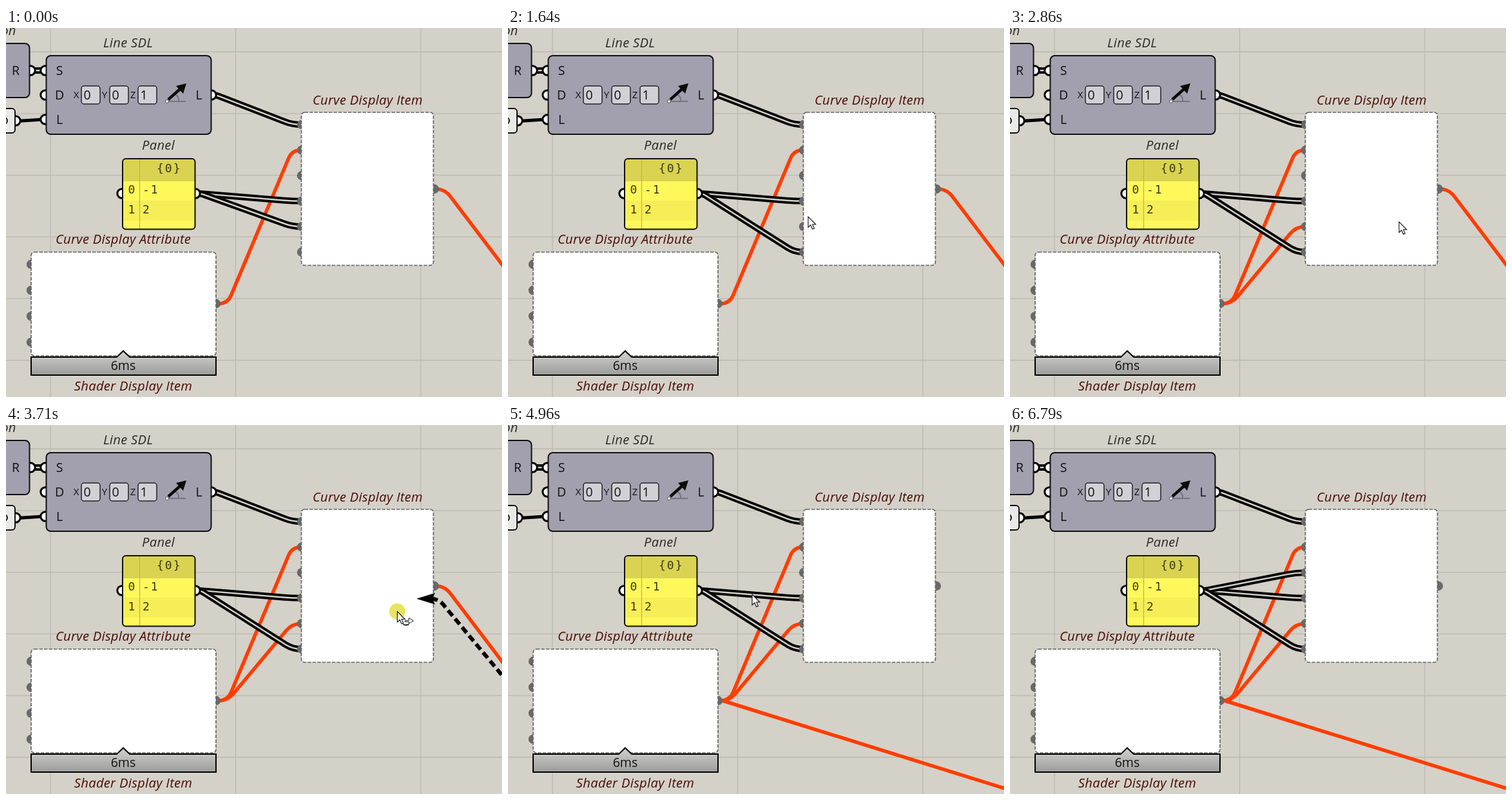
An HTML page that plays this animation: 770x573 px, repeating every 7910 ms.

```html
<!DOCTYPE html>
<html lang="en">
<head>
<meta charset="utf-8">
<title>Rewiring nodes</title>
<style>
html, body { margin: 0; width: 100%; height: 100%; overflow: hidden; background: #d4d1c8; }
svg { display: block; width: 770px; height: 573px; }
text { font: 19.5px "Open Sans", "Noto Sans", sans-serif; fill: #111; }
.title { font-size: 20.2px; font-style: italic; letter-spacing: .3px; text-anchor: middle; fill: #4a0c06; }
.dark { fill: #2b2925; }
.mid { text-anchor: middle; }
.axis { font-size: 15px; text-anchor: middle; }
.mono { font: 18px "DejaVu Sans Mono", "Noto Sans Mono", monospace; letter-spacing: 2px; fill: #3c3912; }
.node { fill: #a2a0ae; stroke: #111; stroke-width: 2; }
.blank { fill: #fff; stroke: #666; stroke-width: 1.7; stroke-dasharray: 5.5 2; }
.field { fill: #d1d0d6; stroke: #222; stroke-width: 1.5; }
.port { fill: #fff; stroke: #000; stroke-width: 3; }
.grip { fill: #696969; }
path { fill: none; }
.red { stroke: #ff3d00; stroke-width: 5.5; }
.outer { stroke: #000; stroke-width: 10; }
.inner { stroke: #d4d1c8; stroke-width: 2.4; }
.single { stroke: #000; stroke-width: 5; }
</style>
</head>
<body>
<svg viewBox="0 0 770 573">
  <defs>
    <linearGradient id="steel" x1="0" y1="0" x2="0" y2="1">
      <stop offset="0" stop-color="#d2d2d0"/><stop offset="1" stop-color="#9c9c9a"/>
    </linearGradient>
  </defs>
  <g id="grid" stroke="#bbb8af" stroke-width="1.3"></g>
  <g id="wires"></g>
  <g id="ports"></g>

  <rect class="node" x="-20" y="24" width="56.5" height="84" rx="7"/>
  <text class="mid" x="15" y="73">R</text>
  <rect class="node" x="-20" y="125" width="34" height="38" rx="5" style="fill:#e9e9e7"/>
  <circle cx="-3" cy="144" r="5" fill="none" stroke="#111" stroke-width="2"/>

  <rect class="node" x="62.5" y="43" width="256" height="122" rx="7"/>
  <g id="fields"></g>
  <path d="M250 114H279M250 114L262 103Q269 106 268 114" stroke="#777580" stroke-width="2"/>
  <path d="M252 111L271 94" stroke="#0b0b0b" stroke-width="4.5"/>
  <path d="M280 86L275 102L264 90Z" style="fill:#0b0b0b"/>
  <circle cx="250" cy="114" r="2.5" fill="#eee" stroke="#555"/>

  <rect x="181" y="203" width="112.5" height="109.5" rx="5" fill="#fff85b"/>
  <path d="M181 238V208Q181 203 186 203H288Q293.5 203 293.5 208V238Z" style="fill:#d9d351"/>
  <rect x="182" y="268" width="111" height="31" fill="#f5ee57"/>
  <path d="M207.5 204V312" stroke="#bdb54a" stroke-width="1.2"/>
  <rect x="181" y="203" width="112.5" height="109.5" rx="5" fill="none" stroke="#111" stroke-width="2"/>
  <text class="mono" x="234" y="224">{0}</text>
  <text class="mono" x="189.5" y="257">0</text>
  <text class="mono" x="189.5" y="288">1</text>
  <text class="mono" x="212" y="257">-1</text>
  <text class="mono" x="212" y="288">2</text>

  <rect class="blank" x="458.5" y="131" width="205" height="237.5" rx="5"/>
  <rect class="blank" x="39" y="348" width="287" height="161" rx="5"/>
  <path d="M39 511H172L182 501.5L192 511H326V539H39Z" style="fill:url(#steel)" stroke="#000" stroke-width="2"/>
  <text class="mid" x="182" y="531">6ms</text>

  <g id="titles"></g>

  <path id="lead" stroke="#000" stroke-width="6" stroke-dasharray="11 6"/>
  <path id="head" d="M0 0L-29 -9L-24 0L-29 9Z" style="fill:#000"/>
  <g id="cursor">
    <g id="press">
      <circle r="12.5" fill="#e6df4c" opacity=".88"/>
      <path d="M9 20Q13 22 18 20" stroke="#444" stroke-width="2.5"/>
      <path d="M12 14H18V10L25 14.5L18 19V16H12Z" style="fill:#fff" stroke="#222"/>
    </g>
    <path d="M0 0V16.5L3.9 13L6.6 19.3L9.4 18.1L6.7 12H11.8Z" style="fill:#fff" stroke="#111" stroke-width="1.1"/>
  </g>
</svg>
<script>
const LOOP = 7910, STEP = 70;
const $ = id => document.getElementById(id);

function add(parent, tag, attrs, text) {
  const el = document.createElementNS("http://www.w3.org/2000/svg", tag);
  for (const k in attrs) el.setAttribute(k, attrs[k]);
  if (text) el.textContent = text;
  return $(parent).appendChild(el);
}
const show = (el, on) => el.setAttribute("visibility", on ? "visible" : "hidden");

// Wire with a horizontal stub at both ends and rounded corners
function route([x1, y1], [x2, y2], d1 = 14, d2 = 14) {
  const ax = x1 + d1, bx = x2 - d2, dx = bx - ax, dy = y2 - y1;
  const len = Math.hypot(dx, dy) || 1;
  const bend = d => Math.min(d, len / 2) / len;
  const r1 = bend(d1), r2 = bend(d2);
  return `M${x1} ${y1}Q${ax} ${y1} ${ax + dx * r1} ${y1 + dy * r1}` +
         `L${bx - dx * r2} ${y2 - dy * r2}Q${bx} ${y2} ${x2} ${y2}`;
}

const wire = (d, ...layers) => layers.map(c => add("wires", "path", { class: c, d }));
const redWire = d => wire(d, "red");
const doubleWire = (a, b) => wire(route(a, b, 5, 13), "outer", "inner");

const input = i => [458, 150 + 39.6 * i];
const PANEL = [297, 257], ATTR = [330, 428], OUT = [667, 250], FAR = [973, 616];

for (let i = 0; i < 3; i++) add("grid", "path", { d: `M${69 + i * 287.5} 0V573` });
for (let i = 0; i < 6; i++) add("grid", "path", { d: `M0 ${37 + i * 95.8}H770` });

// Fixed wires, and the ones each drag swaps on release; red lies below black
redWire(route(ATTR, input(1)));
const attrIn = redWire(route(ATTR, input(4)));
const outFar = redWire(route(OUT, FAR));
const attrFar = redWire("M333 428L770 564");
doubleWire([321, 104], input(0));
doubleWire(PANEL, input(3));
const [panel2, panel4, panel5] = [2, 4, 5].map(i => doubleWire(PANEL, input(i)));
wire("M37 66H61", "outer", "inner");
wire("M18 144.5L58 142", "single");

const port = (cx, cy, cls = "port") => add("ports", "circle", { class: cls, cx, cy, r: 7.2 });
port(38, 66);
port(15, 144);
port(319, 104);
port(180, 257);
port(294, 257);
for (let i = 0; i < 3; i++) port(61, 66 + i * 38);
for (let i = 0; i < 6; i++) port(459, input(i)[1], "grip");
for (let i = 0; i < 4; i++) port(39, 367 + i * 40.3, "grip");
port(665, 250, "grip");
port(326, 428, "grip");

[..."SDL"].forEach((s, i) => add("fields", "text", { class: "mid", x: 83, y: 73 + i * 38 }, s));
[..."XYZ"].forEach((s, i) => {
  const x = 117 + i * 44;
  add("fields", "text", { class: "axis", x: x - 8, y: 109 }, s);
  add("fields", "rect", { class: "field", x, y: 90, width: 29, height: 28, rx: 4 });
  add("fields", "text", { x: x + 3.5, y: 111 }, i < 2 ? "0" : "1");
});
add("fields", "text", { class: "mid", x: 299.5, y: 111 }, "L");

const title = (s, x, y, cls = "") => add("titles", "text", { class: "title " + cls, x, y }, s);
title("on", 4, 11, "dark");
title("Line SDL", 189.5, 30, "dark");
title("Panel", 236.5, 189, "dark");
title("Curve Display Item", 561.5, 119);
title("Curve Display Attribute", 182, 335);
title("Shader Display Item", 197.5, 563);

// Stops of the pointer: time and place
const REST = [466, 293], GRAB = [305, 257];
const stops = [
  [70, [524, 506]], [830, input(4)], [900, input(4)], [1330, input(5)],
  [1640, REST], [1840, REST], [2110, [378, 446]], [2300, ATTR],
  [2650, input(4)], [2860, [604, 301]], [3000, [688, 285]], [3430, OUT], [3570, OUT],
  [4130, [429, 408]], [4200, [377, 417]], [4340, ATTR], [4480, ATTR],
  [4960, [379, 263]], [5380, GRAB], [5590, GRAB], [5660, [332, 256]],
  [6080, input(2)], [6790, [512, 549]]
];

// Between two stops the pointer jumps in equal steps
function pointer(t) {
  const i = Math.max(1, stops.findIndex(s => s[0] > t));
  const [t0, [x0, y0]] = stops[i - 1], [t1, [x1, y1]] = stops[i];
  const n = Math.max(1, Math.round((t1 - t0) / STEP));
  const k = Math.max(0, Math.floor((t - t0) / (t1 - t0) * n)) / n;
  return [x0 + (x1 - x0) * k, y0 + (y1 - y0) * k];
}

const drags = [
  { from: 900, to: 1330, end: PANEL, dir: 1, cut: panel4, join: panel5 },
  { from: 2300, to: 2650, end: ATTR, dir: 1, cut: [], join: attrIn },
  { from: 3500, to: 4430, end: FAR, dir: -1, cut: outFar, join: attrFar },
  { from: 5520, to: 6080, end: PANEL, dir: 1, cut: [], join: panel2 }
];

const cursor = $("cursor"), press = $("press"), lead = $("lead"), head = $("head");

function render(t) {
  for (const { to, cut, join } of drags) {
    cut.forEach(el => show(el, t < to));
    join.forEach(el => show(el, t >= to));
  }

  const moving = t >= stops[0][0] && t < stops.at(-1)[0];
  cursor.style.display = moving ? "inline" : "none";
  if (moving) cursor.setAttribute("transform", `translate(${pointer(t)})`);

  const drag = drags.find(d => t >= d.from && t < d.to);
  press.style.display = drag ? "inline" : "none";

  // The loose wire trails the pointer by one step
  let loose = false;
  if (drag) {
    const { from, end, dir } = drag, [x, y] = pointer(Math.max(from, t - STEP));
    const tail = [x - dir * 22, y];
    loose = Math.abs(x - end[0]) > 20;
    lead.setAttribute("d", dir > 0 ? route(end, tail, 14, 12) : route(tail, end, 12, 14));
    head.setAttribute("transform", `translate(${x} ${y}) scale(${dir} 1)`);
  }
  show(lead, loose);
  show(head, loose);
}

const begin = performance.now();
function tick() {
  render((performance.now() - begin) % LOOP);
  requestAnimationFrame(tick);
}
tick();
</script>
</body>
</html>
```
